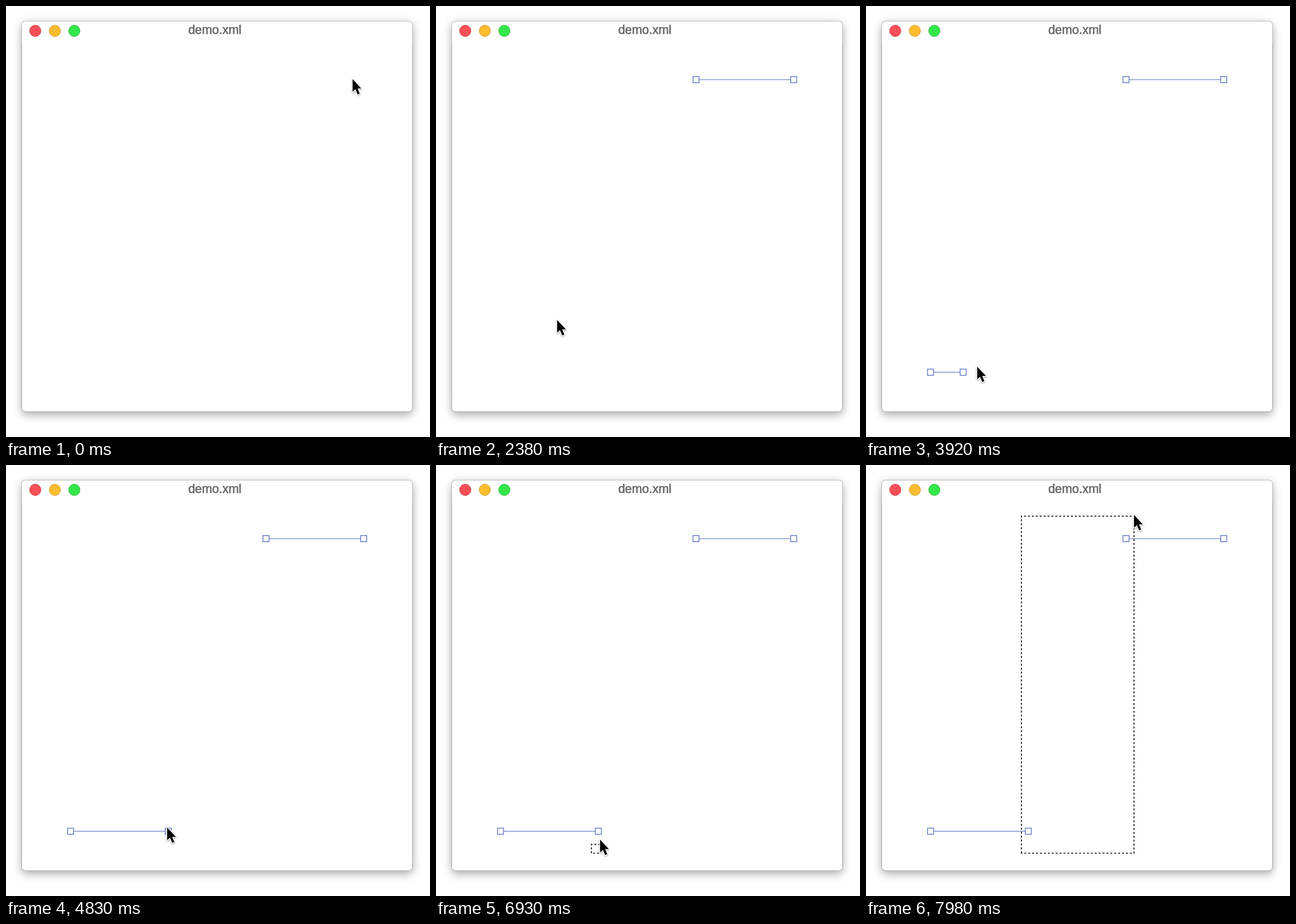
An HTML page that plays this animation: 742x755 px, repeating every 8000 ms.

```html
<!DOCTYPE html>
<html lang="en">
<head>
<meta charset="utf-8">
<title>demo.xml</title>
<style>
  html, body { margin: 0; width: 100%; height: 100%; overflow: hidden; background: #fff; }
  #stage { position: relative; width: 742px; height: 755px; overflow: hidden; }
  #window {
    position: absolute; left: 28px; top: 27px; width: 683px; height: 683px;
    border-radius: 6px; background: #fff;
    box-shadow: 0 0 0 1px #bababa, 0 1px 1px #999, 0 7px 16px rgba(0, 0, 0, .28), 0 0 17px rgba(0, 0, 0, .1);
  }
  svg { position: absolute; left: 0; top: 0; }
  text { font: 21.5px "Liberation Sans", Arial, sans-serif; fill: #666; stroke: #666; stroke-width: .6; }
  .segment { fill: #fff; stroke: #4f68bd; stroke-width: 1.2; }
  #marquee { fill: none; stroke: #111; stroke-width: 1.71; stroke-dasharray: 3.42; }
  #cursor path {
    fill: #000; stroke: #fff; stroke-width: 3; stroke-linejoin: round; paint-order: stroke;
    filter: drop-shadow(0 1.5px 1.2px rgba(0, 0, 0, .4));
  }
</style>
</head>
<body>
<div id="stage">
  <div id="window"></div>
  <svg width="742" height="755" viewBox="0 0 742 755">
    <circle cx="51.2" cy="43.5" r="9.9" fill="#f95058" stroke="#d13c46"/>
    <circle cx="85.5" cy="43.5" r="9.9" fill="#fbbc2f" stroke="#d49d36"/>
    <circle cx="119.6" cy="43.5" r="9.9" fill="#34e749" stroke="#30b844"/>
    <text x="365.5" y="49" text-anchor="middle">demo.xml</text>
    <path d="M27.5 66V704M711.5 66V704" stroke="#a2a2a2"/>
    <g id="segments"></g>
    <path id="marquee"/>
    <g id="cursor"><path d="M0 0V22.3L5 17.8L8.9 27L12.6 25.4L8.8 16.4H15.4Z"/></g>
  </svg>
</div>
<script>
const LOOP = 8000, STEP = 70, GRID = 57, HALF = 5.3;

const smooth = u => u * u * (3 - 2 * u);
const sineOut = u => Math.sin(u * Math.PI / 2);
const mix = (a, b, u) => a + (b - a) * u;

const home = { x: 606.5, y: 128 };
const pressPoint = { x: 272, y: 680 };

// The pointer rests between moves; a bend is the control point of a curved move.
const moves = [
  { start: 700, end: 1540, to: { x: 451, y: 124 } },
  { start: 1700, end: 2380, to: { x: 212, y: 550 } },
  { start: 2520, end: 3010, to: { x: 123, y: 629 } },
  { start: 3500, end: 4400, to: { x: 282, y: 635 } },
  { start: 5100, end: 5600, to: { x: 285.5, y: 635 } },
  { start: 6300, end: 6800, to: pressPoint },
  { start: 6900, end: 7980, to: { x: 469, y: 87.5 }, bend: { x: 449, y: 410 }, ease: sineOut }
];

const segments = [
  { x: 626, y: 129, press: 420, release: 1680 },
  { x: 113, y: 641.5, press: 3150, release: 4830 }
];

const $ = id => document.getElementById(id);

function between(a, b, u) {
  return { x: mix(a.x, b.x, u), y: mix(a.y, b.y, u) };
}

function pointer(t) {
  let at = home;
  for (const { start, end, to, bend, ease = smooth } of moves) {
    if (t <= start) break;
    const u = ease(Math.min(1, (t - start) / (end - start)));
    at = bend
      ? between(between(at, bend, u), between(bend, to, u), u)
      : between(at, to, u);
  }
  return at;
}

const handle = (x, y) =>
  `M${x - HALF} ${y - HALF}h${2 * HALF}v${2 * HALF}h${-2 * HALF}z`;

for (const segment of segments) {
  segment.path = document.createElementNS("http://www.w3.org/2000/svg", "path");
  segment.path.setAttribute("class", "segment");
  $("segments").append(segment.path);
}

// The dragged end snaps to the grid.
function drawSegment({ x, y, press, release, path }, t) {
  let d = "";
  if (t >= press) {
    const end = x + GRID * Math.round((pointer(Math.min(t, release)).x - x) / GRID);
    d = handle(x, y);
    if (end !== x) {
      const inset = HALF * Math.sign(end - x);
      d += `M${x + inset} ${y}H${end - inset}` + handle(end, y);
    }
  }
  path.setAttribute("d", d);
}

// The rectangle trails the pointer slightly.
function drawMarquee(t) {
  const { x, y } = pressPoint;
  const right = pointer(t).x, top = pointer(t - 8).y + 2;
  const visible = t > moves.at(-1).start && top < y;
  $("marquee").setAttribute("d", visible ? `M${x} ${y}V${top}H${right}V${y}Z` : "");
}

function draw(now) {
  const t = Math.floor((now % LOOP) / STEP) * STEP;
  const { x, y } = pointer(t);
  $("cursor").setAttribute("transform", `translate(${x} ${y})`);
  segments.forEach(segment => drawSegment(segment, t));
  drawMarquee(t);
}

const start = performance.now();
function tick() {
  draw(performance.now() - start);
  requestAnimationFrame(tick);
}
tick();
</script>
</body>
</html>
```
